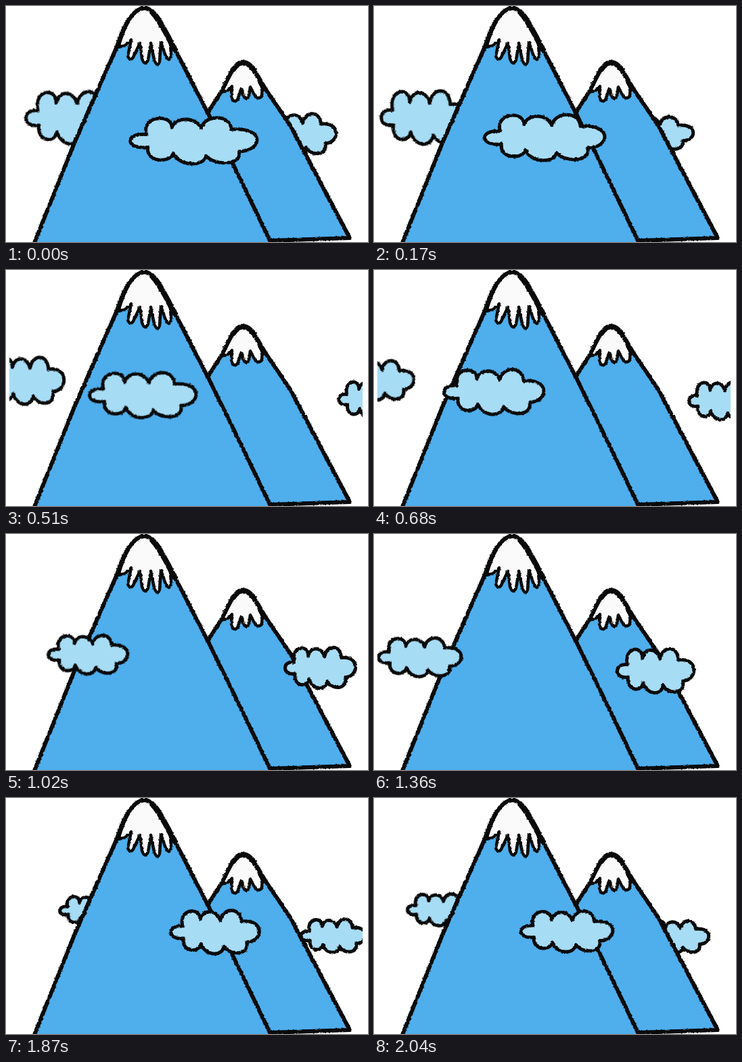
An HTML page that plays this animation: 535x350 px, repeating every 2210 ms.

```html
<!DOCTYPE html>
<html lang="en">
<head>
<meta charset="utf-8">
<title>Clouds around mountains</title>
<style>
  html, body { margin: 0; width: 100%; height: 100%; overflow: hidden; background: #fff; }
  svg { display: block; width: 100%; height: 100%; }
  .ink { stroke: #0a0a0a; stroke-width: 6; stroke-linejoin: round; stroke-linecap: round; }
  .rock { fill: #4faeec; }
  .snow { fill: #fafafa; stroke-width: 4.5; }
  .cloud { fill: #a7dcf5; stroke-width: 5; }
  .cloud path { vector-effect: non-scaling-stroke; }
</style>
</head>
<body>
<svg viewBox="0 0 535 350">
  <defs>
    <filter id="pencil" filterUnits="userSpaceOnUse" x="-60" y="-10" width="660" height="380" color-interpolation-filters="sRGB">
      <feTurbulence type="fractalNoise" baseFrequency=".3" numOctaves="2" seed="4"/>
      <feDisplacementMap in="SourceGraphic" scale="3" xChannelSelector="R" yChannelSelector="G"/>
    </filter>
    <clipPath id="sky"><rect x="5" width="522" height="350"/></clipPath>
  </defs>
  <g clip-path="url(#sky)"><g id="back" class="ink cloud" filter="url(#pencil)"></g></g>
  <g class="ink" filter="url(#pencil)">
    <path class="rock" d="M299 157L320 124C331 100 339 83 350 83C362 83 371 102 384 124L420 177L508 344L390 348L290 348Z"/>
    <path class="snow" d="M319 127Q328 128 334 119L333 134Q336 145 342 139L348 122L351 134Q356 140 359 134L361 120L368 133Q374 140 378 133L379 122C370 101 362 84 350 84C338 84 331 105 319 127Z"/>
    <path class="rock" d="M40 356L101 203L164 60C174 27 189 3 205 3C222 3 234 34 247 59L301 164L347 258L390 348L394 356Z"/>
    <path class="snow" d="M166 61Q178 60 185 50L180 74Q183 83 188 76L198 55L201 78Q205 90 210 80L214 55L219 80Q224 92 227 82L229 54L236 74Q241 84 244 74L243 57C232 30 222 4 205 4C189 4 176 27 166 61Z"/>
    <path fill="none" stroke-width="8" d="M216 9C226 20 237 40 249 64M336 94Q343 84 350 84Q358 84 366 94"/>
  </g>
  <g clip-path="url(#sky)"><g id="front" class="ink cloud" filter="url(#pencil)"></g></g>
</svg>
<script>
const STEP = 170, STEPS = 13, INK = 5;

// One cloud with eight lobes, drawn in a box from -100 to 100.
const CLOUD = `M-74-28C-84-108-34-122-34-58C-28-108 4-106 12-55C18-116 58-118 60-50
  C114-62 110 44 72 46C78 108 34 110 20 66C16 114-22 113-32 54
  C-36 98-76 94-72 28C-109 40-109-38-74-28Z`;

// Drift to the left: step, centre x and y, width, height.
const drift = {
  front: [
    [3, 537, 192, 95, 58],
    [8, 416, 203, 118, 70],
    [10, 333, 200, 130, 73],
    [12, 285, 198, 140, 65],
    [13, 277, 200, 192, 73],
    [17, 177, 181, 152, 71],
    [19, 121, 179, 122, 62],
    [23, 14, 187, 132, 62]
  ],
  back: [
    [10, 520, 203, 100, 56],
    [12, 447, 206, 100, 52],
    [13, 432, 190, 116, 65],
    [15, 400, 188, 116, 42],
    [23, 150, 168, 86, 42],
    [25, 97, 166, 100, 52],
    [26, 97, 166, 140, 82],
    [28, 52, 165, 125, 85],
    [31, -18, 163, 105, 52]
  ]
};

function keyAt(keys, step) {
  const next = keys.findIndex(key => key[0] >= step);
  if (next < 0 || step < keys[0][0]) return null;
  const to = keys[next], from = keys[Math.max(0, next - 1)];
  const k = (step - from[0]) / (to[0] - from[0] || 1);
  return from.map((v, i) => v + (to[i] - v) * k);
}

const cloud = ([, x, y, w, h]) =>
  `<path d="${CLOUD}" transform="translate(${x} ${y}) scale(${(w - INK) / 200} ${(h - INK) / 200})"/>`;

// A crossing lasts longer than the loop, so later laps overlap the first.
function draw(step) {
  for (const layer in drift) {
    document.getElementById(layer).innerHTML = [0, 1, 2]
      .map(lap => keyAt(drift[layer], step + lap * STEPS))
      .filter(Boolean).map(cloud).join('');
  }
}

const start = performance.now();
let shown = -1;
function tick(now) {
  const step = Math.floor(Math.max(0, now - start) / STEP) % STEPS;
  if (step !== shown) draw(shown = step);
  requestAnimationFrame(tick);
}
tick(start);
</script>
</body>
</html>
```
